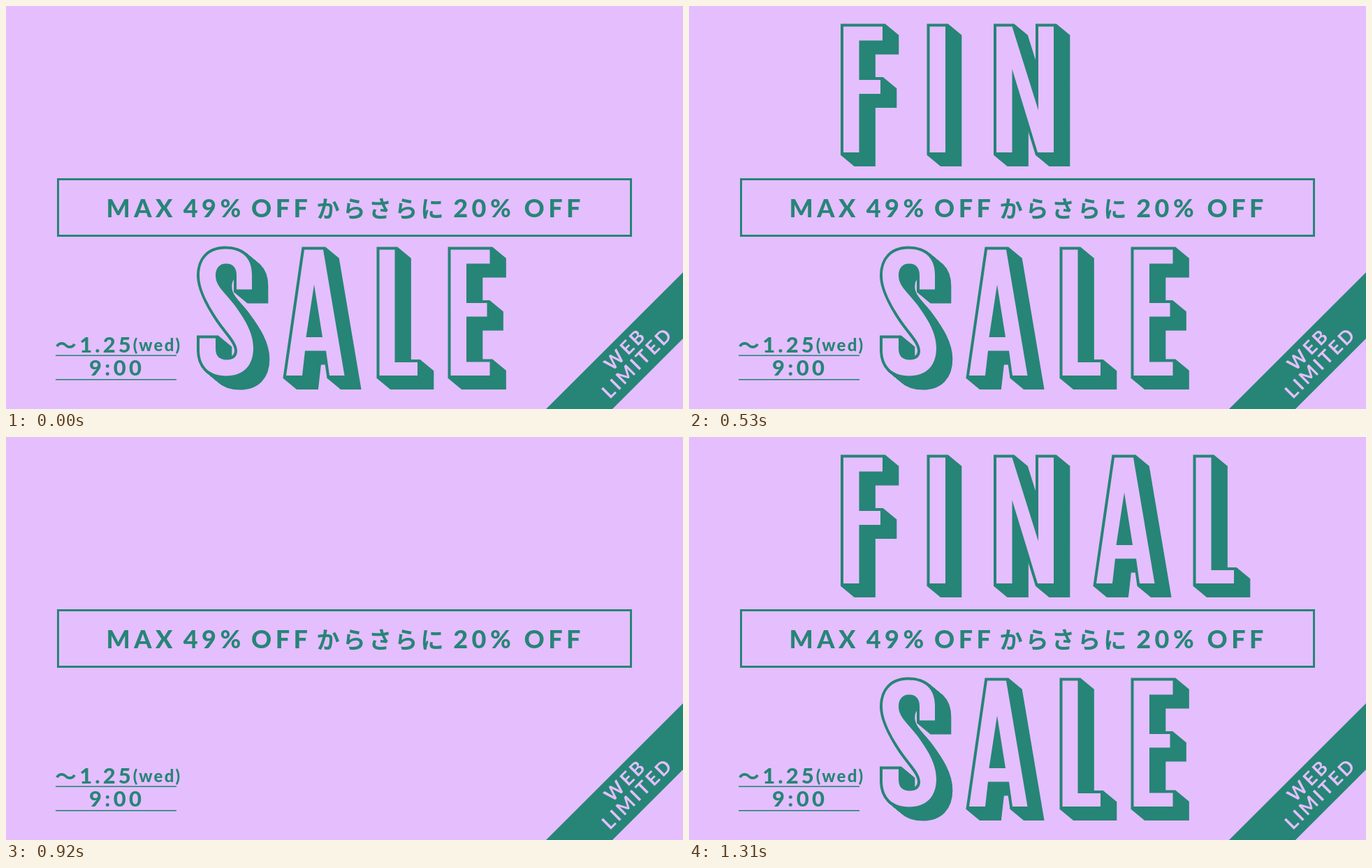
Write an HTML page with a canvas that moves like this. It is 969 px wide and 578 px high and loops after 2.31 s.

```html
<!DOCTYPE html>
<html lang="ja">
<head>
<meta charset="utf-8">
<title>Final Sale</title>
<style>
  html, body { margin: 0; width: 100%; height: 100%; overflow: hidden; background: #e5befd; }
  canvas { display: block; }
</style>
</head>
<body>
<canvas id="stage" width="969" height="578"></canvas>
<script>
const ctx = document.getElementById('stage').getContext('2d');
const PINK = '#e5befd', GREEN = '#268577';
const LATIN = 'Lato, sans-serif';
const KANA = '"Noto Sans CJK JP", "Noto Sans CJK", sans-serif';
const LOOP = 2310, START = 270, STEP = 130;
const DEPTH = { x: 19.3, y: 16 };

// Letter faces; the top left of each face is at 0,0.
const GLYPHS = {
  F: 'M0 0H56V20H22.5V76.5H53V96.5H22.5V180.5H0Z',
  I: 'M0 0H22.5V180.5H0Z',
  N: 'M0 0H22.5L60 120V0H82V180.5H59L22.5 61V180.5H0Z',
  A: 'M26 0H53L83.5 180.5H62L57 145H27L23 180.5H0ZM40 50L28.5 125.5H52Z',
  L: 'M0 0H22V161.5H54.5V180.5H0Z',
  E: 'M0 0H56V20H22.5V76.5H52V96H22.5V161H56V180.5H0Z',
  S: 'M75 57V36C75 12 61 -1 37 -1C13 -1 0 14 0 37C0 57 13 80 27 101' +
     'C41 121 54 133 54 145C54 154 48 158 39 158C29 158 23 153 23 142V127H0V144' +
     'C0 167 14 181 38 181C63 181 77 166 77 141C77 118 63 97 49 78' +
     'C36 61 23 52 23 37C23 26 29 20 38 20C48 20 53 26 53 37V57Z'
};
const FINAL = [['F', 221], ['I', 344.5], ['N', 440], ['A', 583], ['L', 725.5]];
const SALE = [['S', 277], ['A', 401], ['L', 534.5], ['E', 636.5]];

function letter([name, x], y) {
  const face = new Path2D(GLYPHS[name]);
  const steps = 32;
  ctx.save();
  ctx.translate(x, y);
  ctx.fillStyle = ctx.strokeStyle = GREEN;
  ctx.lineWidth = 8;
  ctx.miterLimit = 4;
  for (let i = 0; i <= steps; i++) {
    ctx.save();
    ctx.translate(DEPTH.x * i / steps, DEPTH.y * i / steps);
    ctx.stroke(face);
    ctx.fill(face);
    ctx.restore();
  }
  // Keep the counter of the A solid, then lay the face on top.
  ctx.fillStyle = PINK;
  ctx.fill(face);
  ctx.restore();
}

function word(text, cx, y, size, gap, weight = 800, family = LATIN) {
  ctx.font = `${weight} ${size}px ${family}`;
  ctx.letterSpacing = gap + 'px';
  ctx.textAlign = 'center';
  ctx.fillText(text, cx + gap / 2, y);
}

function rotatedWord(text, cx, cy, size, gap) {
  ctx.save();
  ctx.translate(cx, cy);
  ctx.rotate(-Math.PI / 4);
  word(text, 0, size * 0.36, size, gap, 700);
  ctx.restore();
}

function offer() {
  ctx.strokeStyle = ctx.fillStyle = GREEN;
  ctx.lineWidth = 3;
  ctx.strokeRect(74.5, 248.5, 820, 81);
  word('MAX', 191, 303, 36, 5.5);
  word('49%', 295, 303, 36, 5.5);
  word('OFF', 391.5, 303, 36, 5.5);
  word('からさらに', 535.5, 303, 33, 4.3, 700, KANA);
  word('20%', 681.5, 303, 36, 5.5);
  word('OFF', 782, 303, 36, 5.5);
}

function deadline() {
  ctx.fillStyle = GREEN;
  word('〜', 85.5, 498, 31, 0, 700, KANA);
  word('1.25', 142, 497, 31, 4);
  word('(wed)', 215.5, 495, 24, 2.2);
  word('9:00', 156.5, 530, 31, 4.3);
  ctx.fillRect(71, 500.5, 173, 1.6);
  ctx.fillRect(71, 535, 173, 1.6);
}

function ribbon() {
  ctx.fillStyle = GREEN;
  ctx.fill(new Path2D('M969 382V477L868 578H773Z'));
  ctx.fillStyle = PINK;
  rotatedWord('WEB', 885, 493.5, 27, 3.5);
  rotatedWord('LIMITED', 902.5, 512.5, 27, 3.3);
}

function draw(step) {
  const blank = step === 6 || step === 8;
  ctx.fillStyle = PINK;
  ctx.fillRect(0, 0, 969, 578);
  offer();
  deadline();
  ribbon();
  if (blank) return;
  FINAL.slice(0, step).forEach(l => letter(l, 29.5));
  SALE.forEach(l => letter(l, 349.5));
}

// Step 0 has no top word, 1-5 spell it, 6 and 8 blink off, 9 holds.
function stepAt(time) {
  const t = time % LOOP;
  return t < START ? 0 : Math.min(9, 1 + Math.floor((t - START) / STEP));
}

let shown = -1;
function tick(now) {
  const step = stepAt(now);
  if (step !== shown) draw(shown = step);
  requestAnimationFrame(tick);
}
tick(performance.now());
</script>
</body>
</html>
```
